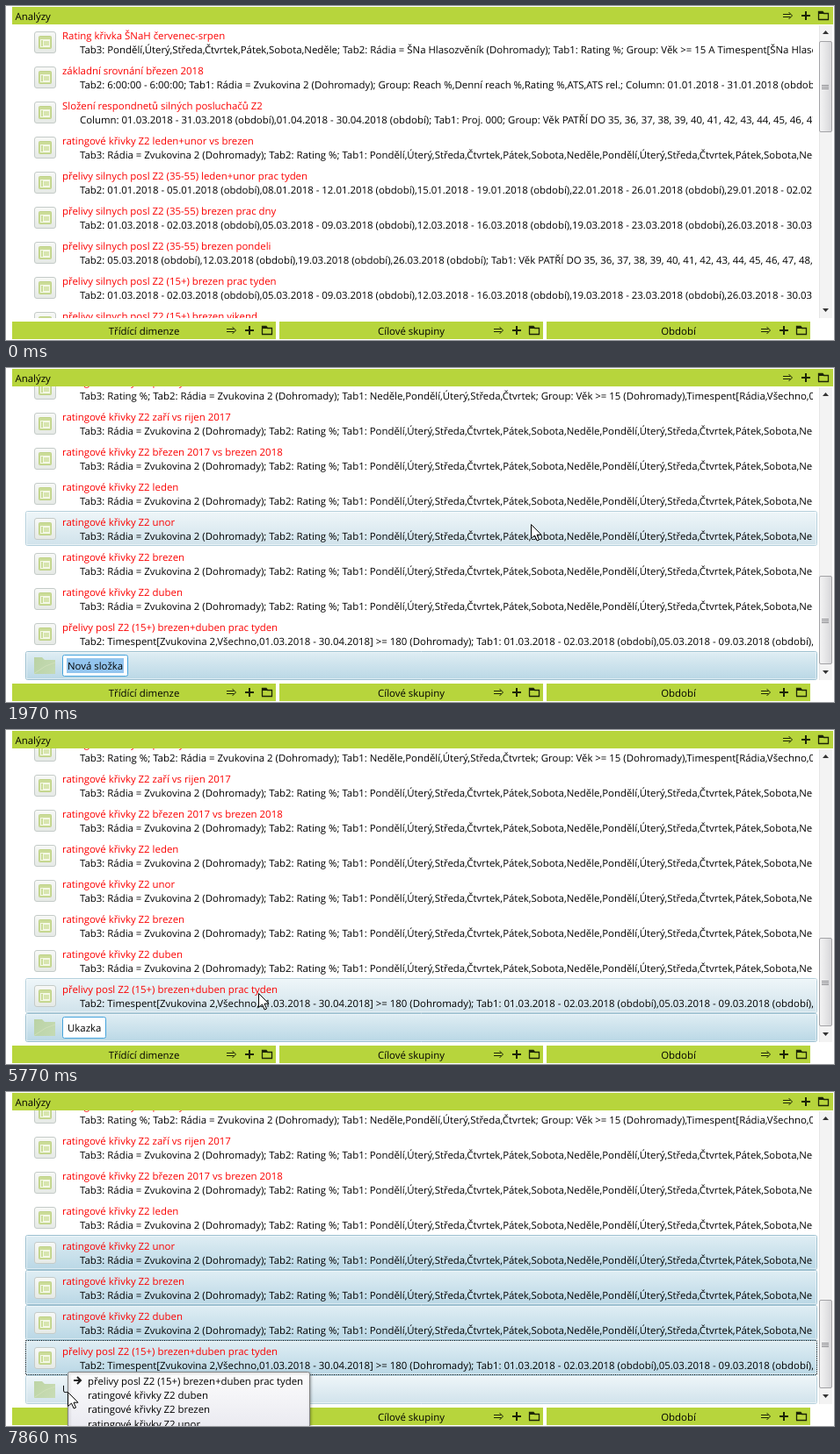
Write an HTML page with a canvas that moves like this. It is 942 px wide and 381 px high and loops after 8 s.

```html
<!DOCTYPE html>
<html lang="cs">
<head>
<meta charset="utf-8">
<title>Analýzy</title>
<style>
html, body { margin: 0; width: 100%; height: 100%; overflow: hidden; background: #fff; }
canvas { display: block; width: 942px; height: 381px; }
</style>
</head>
<body>
<canvas id="stage"></canvas>
<script>
const W = 942, H = 381, LOOP = 8000;
const canvas = document.getElementById('stage');
const c = canvas.getContext('2d');
const ratio = window.devicePixelRatio || 1;
canvas.width = W * ratio;
canvas.height = H * ratio;

const GREEN = '#b7d53c', RED = '#fb0000';
const FONT = '11.42px "Open Sans", "Noto Sans", sans-serif';

// List contents
const week = 'Pondělí,Úterý,Středa,Čtvrtek,Pátek,Sobota,Neděle';
const weeks = [week, week, week].join(',');
const station = 'Rádia = Zvukovina 2 (Dohromady)';
const curve = `Tab3: ${station}; Tab2: Rating %; Tab1: ${weeks}`;
const span = (a, b) => `${a}.2018 - ${b}.2018 (období)`;
const spans = list => list.split(' ').map(p => span(...p.split('-'))).join(',');
const ages = 'Věk PATŘÍ DO ' + Array.from({ length: 16 }, (_, i) => 35 + i).join(', ');
const january = 'Tab2: ' + spans('01.01-05.01 08.01-12.01 15.01-19.01 22.01-26.01 29.01-02.02');
const march = 'Tab2: ' + spans('01.03-02.03 05.03-09.03 12.03-16.03 19.03-23.03 26.03-30.03');
const mondays = ['05', '12', '19', '26'].map(d => d + '.03.2018 (období)').join(',');

const topRows = [
  ['Rating křivka ŠNaH červenec-srpen',
    `Tab3: ${week}; Tab2: Rádia = ŠNa Hlasozvěník (Dohromady); Tab1: Rating %; Group: Věk >= 15 A Timespent[ŠNa Hlasozvěník`],
  ['základní srovnání březen 2018',
    `Tab2: 6:00:00 - 6:00:00; Tab1: ${station}; Group: Reach %,Denní reach %,Rating %,ATS,ATS rel.; Column: ${span('01.01', '31.01')}`],
  ['Složení respondnetů silných posluchačů Z2',
    `Column: ${spans('01.03-31.03 01.04-30.04')}; Tab1: Proj. 000; Group: ${ages}`],
  ['ratingové křivky Z2 leden+unor vs brezen', curve],
  ['přelivy silnych posl Z2 (35-55) leden+unor prac tyden', january],
  ['přelivy silnych posl Z2 (35-55) brezen prac dny', march],
  ['přelivy silnych posl Z2 (35-55) brezen pondeli', `Tab2: ${mondays}; Tab1: ${ages}`],
  ['přelivy silnych posl Z2 (15+) brezen prac tyden', march],
  ['přelivy silnych posl Z2 (15+) brezen vikend', march]
];
const endRows = [
  ['ratingové křivky Z2 prac tyden',
    `Tab3: Rating %; Tab2: ${station}; Tab1: Neděle,Pondělí,Úterý,Středa,Čtvrtek; Group: Věk >= 15 (Dohromady),Timespent[Rádia,Všechno,01.03.2018`],
  ...['zaří vs rijen 2017', 'březen 2017 vs brezen 2018', 'leden', 'unor', 'brezen', 'duben']
    .map(name => ['ratingové křivky Z2 ' + name, curve]),
  ['přelivy posl Z2 (15+) brezen+duben prac tyden',
    `Tab2: Timespent[Zvukovina 2,Všechno,01.03.2018 - 30.04.2018] >= 180 (Dohromady); Tab1: ${spans('01.03-02.03 05.03-09.03 12.03-16.03')}`]
];
const dragged = [7, 6, 5, 4].map(i => endRows[i][0]);

// Pointer moves: first step, last step, number of steps, end point
const START = [690, 335];
const moves = [
  [390, 1170, 8, 929, 9],
  [1850, 2280, 5, 431, 263],
  [5010, 5440, 5, 287, 300],
  [6100, 6430, 4, 268, 185],
  [6750, 7080, 4, 150, 303],
  [7300, 7520, 3, 73, 336],
  [7620, 7860, 3, 70, 342]
];

function pointer(t) {
  if (t < moves[0][0]) return null;
  let [x, y] = START;
  for (const [t0, t1, n, ex, ey] of moves) {
    if (t < t0) break;
    const k = Math.min(n - 1, Math.floor((t - t0) / (t1 - t0) * (n - 1) + 1e-6));
    const u = t0 === moves[0][0] ? k / (n - 1) : (k + 1) / n;
    const p = 1 - Math.pow(1 - u, 2.15);
    x += (ex - x) * p;
    y += (ey - y) * p;
  }
  return { x: Math.round(x), y: Math.round(y) };
}

function rect(x, y, w, h, fill) {
  c.fillStyle = fill;
  c.fillRect(x, y, w, h);
}

function box(x, y, w, h, r, fill, stroke) {
  c.beginPath();
  c.roundRect(x + .5, y + .5, w - 1, h - 1, r);
  c.fillStyle = fill;
  c.fill();
  c.strokeStyle = stroke;
  c.lineWidth = 1;
  c.stroke();
}

function fade(x0, y0, x1, y1, a, b) {
  const g = c.createLinearGradient(x0, y0, x1, y1);
  g.addColorStop(0, a);
  g.addColorStop(1, b);
  return g;
}

function text(s, x, y, color = '#000', align = 'left') {
  c.fillStyle = color;
  c.textAlign = align;
  c.fillText(s, x, y);
}

function line(points, color, width) {
  c.beginPath();
  points.forEach(([x, y], i) => i ? c.lineTo(x, y) : c.moveTo(x, y));
  c.strokeStyle = color;
  c.lineWidth = width;
  c.stroke();
}

// Arrow, plus and folder; x is the centre of the folder
function tools(x, y) {
  const ink = '#1c2408', a = x - 46;
  line([[a, y - 1.5], [a + 8.5, y - 1.5]], ink, 1);
  line([[a, y + 1.5], [a + 8.5, y + 1.5]], ink, 1);
  line([[a + 6.5, y - 4], [a + 10.5, y], [a + 6.5, y + 4]], ink, 1);
  rect(x - 25, y - 1, 10, 2, ink);
  rect(x - 21, y - 5, 2, 10, ink);
  line([[x - 5.5, y + 4.5], [x - 5.5, y - 4.5], [x - 1, y - 4.5], [x + .5, y - 2.5],
    [x + 5.5, y - 2.5], [x + 5.5, y + 4.5], [x - 6, y + 4.5]], ink, 1.3);
  rect(x - 5, y - 4, 5, 2, ink);
}

function rowBack(y, h, style) {
  if (!style) return;
  const [a, b, edge] = style === 'selected'
    ? ['#e0eef4', '#b9d7e5', '#9cc0d0']
    : ['#eff6f9', '#d0e2eb', '#b5d0dc'];
  box(22, y, 901, h, 2, fade(0, y, 0, y + h, a, b), edge);
  c.strokeStyle = 'rgba(255,255,255,.5)';
  c.strokeRect(23.5, y + 1.5, 898, h - 3);
}

function sheetIcon(x, y) {
  box(x, y, 25, 25, 2.5, fade(0, y, 0, y + 25, '#f8f9f7', '#e5e9e5'), '#c4cbc8');
  box(x + 5, y + 5, 15, 15, 1, '#cbdc98', '#bfd287');
  rect(x + 7, y + 9, 11, 9, '#f4f8e6');
  rect(x + 8, y + 10, 2, 7, '#cbdc98');
  rect(x + 11, y + 11, 6, 5, '#d7e5ae');
}

function folderIcon(x, y) {
  c.globalAlpha = .8;
  c.beginPath();
  c.moveTo(x, y);
  c.lineTo(x + 9, y);
  c.lineTo(x + 12, y + 3);
  c.lineTo(x + 24, y + 3);
  c.lineTo(x + 24, y + 19);
  c.lineTo(x, y + 19);
  c.closePath();
  c.fillStyle = fade(x, y, x + 20, y + 20, '#b3cd91', '#c4d9a6');
  c.fill();
  line([[x, y + 18.5], [x + 13, y + 10], [x + 24, y + 6]], '#d3e2bd', 1);
  c.globalAlpha = 1;
}

function row([title, detail], y, style, focus) {
  rowBack(y, 40, style);
  if (focus) {
    c.setLineDash([1, 1.5]);
    c.strokeStyle = '#111';
    c.lineWidth = 1;
    c.strokeRect(22.5, y + .5, 900, 39);
    c.setLineDash([]);
  }
  sheetIcon(32, y + 8);
  c.save();
  c.beginPath();
  c.rect(22, y, 896, 40);
  c.clip();
  text(title, 64, y + 17, RED);
  text(detail, 84, y + 33);
  c.restore();
}

function editor(t) {
  const fresh = t < 3040;
  const typed = [3040, 3250, 3470, 3570, 4020, 4130].filter(s => t >= s).length;
  const s = fresh ? 'Nová složka' : 'Ukazka'.slice(0, typed);
  const w = c.measureText(s).width;
  box(64, 327, Math.round(w) + 12, 25, 2, '#fff', '#45a3dc');
  if (fresh) rect(69, 331, Math.round(w) + 2, 17, '#93c5ef');
  text(s, 70, 344);
  const caret = (t >= 4240 && t < 4790) || (t >= 5340 && t < 5770);
  if (caret) rect(Math.round(70 + w), 331, 1, 17, '#000');
}

function scrollbar(top, height) {
  rect(925, 22, 15, 334, '#f3f3f3');
  rect(925, 22, 1, 334, '#e6e6e6');
  box(925, top, 15, height, 1.5, fade(925, 0, 940, 0, '#f6f6f6', '#d5d5d8'), '#a3a3a6');
  const mid = Math.round(top + height / 2);
  for (let i = -1; i < 2; i++) rect(928, mid + i * 2, 8, 1, '#8c8c90');
  for (const [y, d] of [[30, -1], [347, 1]]) {
    c.beginPath();
    c.moveTo(929, y - d * 2);
    c.lineTo(936, y - d * 2);
    c.lineTo(932.5, y + d * 2);
    c.fillStyle = '#333';
    c.fill();
  }
}

function list(t, p) {
  const scrolled = t >= 1610;
  const first = scrolled ? 3 : 21;
  const inside = p && p.y > 21 && p.y < 356 && p.x < 923;
  const over = inside ? Math.floor((p.y - first) / 40) : -1;
  const from = t >= 6540 ? 4 : 7;
  const focus = t >= 7190 ? 7 : t >= 6540 ? 4 : -1;

  c.save();
  c.beginPath();
  c.rect(22, 21, 901, 335);
  c.clip();
  (scrolled ? endRows : topRows).forEach((r, i) => {
    const chosen = t >= 5860 && i >= from;
    row(r, first + 40 * i, chosen ? 'selected' : i === over ? 'hover' : '', i === focus);
  });
  if (scrolled) {
    const editing = t < 5860;
    rowBack(323, 33, editing ? 'selected' : over === 8 ? 'hover' : '');
    folderIcon(32, 330);
    if (editing) editor(t);
    else text('Ukazka', 64, 343);
  }
  c.restore();

  if (scrolled) scrollbar(237, 101);
  else if (t >= 1510) scrollbar(40, 101);
  else scrollbar(40, 104);
}

function bars(p) {
  rect(7, 1, 934, 20, GREEN);
  if (p && p.y < 21 && p.x > 921) rect(921, 1, 20, 20, '#e4e9ec');
  text('Analýzy', 10.5, 16);
  tools(930, 11);
  ['Třídící dimenze', 'Cílové skupiny', 'Období'].forEach((s, i) => {
    const x = 7 + 304 * i;
    rect(x, 360, 300, 20, GREEN);
    text(s, x + 150, 375, '#000', 'center');
    tools(x + 290, 370);
  });
}

function dragMenu({ x, y }) {
  const top = y - 23;
  c.save();
  c.shadowColor = 'rgba(0,0,0,.3)';
  c.shadowBlur = 3;
  c.shadowOffsetX = c.shadowOffsetY = 1;
  box(x, top, 276, 76, 2, fade(0, top, 0, top + 76, '#fdfdfd', '#e6e6ee'), '#858585');
  c.restore();
  const ay = top + 10;
  line([[x + 7, ay], [x + 14, ay]], '#222', 2);
  line([[x + 11, ay - 4], [x + 15, ay], [x + 11, ay + 4]], '#222', 2);
  dragged.forEach((s, i) => text(s, x + 23, top + 15 + i * 16.2));
}

function arrow({ x, y }) {
  const shape = [[0, 0], [0, 16], [4, 12.5], [6.7, 18.5], [9, 17.5], [6.5, 11.7], [11.5, 11.7]];
  c.beginPath();
  shape.forEach(([a, b]) => c.lineTo(x + .5 + a, y + .5 + b));
  c.closePath();
  c.fillStyle = '#fff';
  c.fill();
  c.strokeStyle = '#000';
  c.lineWidth = 1;
  c.stroke();
}

function draw(t) {
  c.setTransform(ratio, 0, 0, ratio, 0, 0);
  rect(0, 0, W, H, '#fff');
  c.font = FONT;
  c.textBaseline = 'alphabetic';
  c.textRendering = 'geometricPrecision';
  const p = pointer(t);
  list(t, p);
  bars(p);
  if (t >= 7300) dragMenu(p);
  if (p) arrow(p);
}

const begin = performance.now();
function tick() {
  draw((performance.now() - begin) % LOOP);
  requestAnimationFrame(tick);
}
tick();
</script>
</body>
</html>
```
